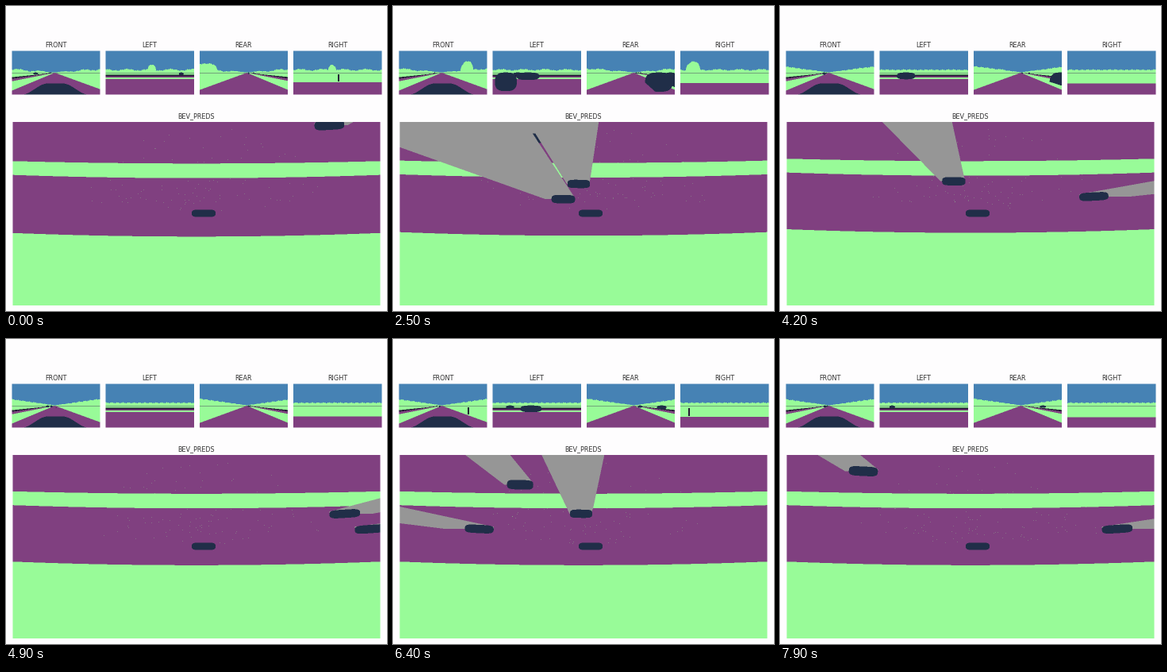
Write a matplotlib script that moves like this. It is 480 by 384 pixels and loops after 8 s.

```python
import numpy as np
import matplotlib.pyplot as plt
from matplotlib.animation import FuncAnimation

W, H, FPS, FRAMES = 480, 384, 10, 80
SS = 2  # supersampling of the label map

PALETTE = np.array([(254, 253, 254), (70, 130, 180), (152, 251, 152),
                    (128, 64, 128), (32, 46, 72), (36, 26, 53),
                    (150, 150, 150), (116, 164, 124)]) / 255
PAGE, SKY, GRASS, ROAD, CAR, RAIL, HIDDEN, LINE = range(len(PALETTE))

lab = np.zeros((H * SS, W * SS), np.uint8)
Y, X = (np.mgrid[0:H * SS, 0:W * SS] + 0.5) / SS

EGO_X, EGO_Y = 249, 261
EYE_X = 242
HORIZON = 84
VANISH = {"FRONT": 61.5, "LEFT": 181, "REAR": 303.5, "RIGHT": 417.5}
FOCAL = {"FRONT": 38, "LEFT": 41, "REAR": 45}

# Oncoming cars: time beside the own car, lane height
ONCOMING = [(-1.04, 166.5), (0.33, 150), (1.08, 167), (1.175, 185),
            (1.28, 151), (2.36, 166.5), (3.34, 166.5), (6.215, 183.5),
            (7.6, 166.5)]
# Cars going the same way: time beside the own car, lane height, speed
PASSING = [(2.55, 225, 300), (2.8, 244.2, 113), (4.3, 225, 300),
           (6.44, 225, 300), (7.05, 244.2, 212)]

# Large trees: time, x, half width, height
TREES = {
    "FRONT": [(1.1, 6, 15, 23), (1.1, 90, 7, 6), (2.5, 93, 8, 11)],
    "LEFT": [(0, 184, 5, 6), (1.1, 195, 9, 10), (3.4, 147, 5, 6)],
    "REAR": [(0, 251, 15, 8), (1.1, 245, 12, 15), (3.4, 252, 6, 7)],
    "RIGHT": [(0, 411, 5, 7), (1.1, 437, 9, 10), (2.5, 378, 9, 10)],
}
TREE_SPEED = {"LEFT": -50, "RIGHT": 70}
TREE_GROWTH = {"FRONT": 0.9, "REAR": -0.9}


def view(x0, y0, x1, y1):
    s = np.s_[round(y0 * SS):round(y1 * SS), round(x0 * SS):round(x1 * SS)]
    return lab[s], X[s], Y[s]


def smooth(v, a, b):
    u = np.clip((v - a) / (b - a), 0, 1)
    return u * u * (3 - 2 * u)


def drift(t):
    """How far the road has shifted sideways, 0 to 1."""
    return smooth(t, 1.5, 5)


def blob(x, y, cx, cy, w, h, tilt=0.0, power=(5, 3)):
    c, s = np.cos(tilt), np.sin(tilt)
    u = ((x - cx) * c + (y - cy) * s) / (w / 2)
    v = ((y - cy) * c - (x - cx) * s) / (h / 2)
    return np.abs(u) ** power[0] + np.abs(v) ** power[1] < 1


def cars_at(t):
    """Cars as (x, y, length, height), farthest first."""
    spots = [(EGO_X - 480 * (t - t0), y, 12) for t0, y in ONCOMING]
    for t0, y, speed in PASSING:
        d = t - t0
        spots.append((EGO_X + speed * d - 6 * d * d, y - 5 * drift(t), 10.5))
    cars = [(x, y, 27.5 + 0.063 * abs(x - EGO_X), h) for x, y, h in spots]
    return sorted(cars, key=lambda c: -np.hypot(c[0] - EGO_X, c[1] - EGO_Y))


def cast_shadow(out, x, y, car):
    cx, cy, length, h = car
    far = y[:, 0] < cy
    out, x, y = out[far], x[far], y[far]
    xs = cx + 0.46 * length * np.array([-1, -1, 1, 1])
    ys = cy + 0.3 * h * np.array([-1, 1, -1, 1])
    edge = (xs - EYE_X) / (EGO_Y - ys)
    ray = (x - EYE_X) / (EGO_Y - y)
    outward = np.sign(cx - EYE_X) * (x - cx) > -length / 2
    shade = (ray > edge.min()) & (ray < edge.max())
    out[shade & (outward | (y < cy - h / 2))] = HIDDEN
    return far, out


def draw_top(t, cars, rng):
    out, x, y = view(8.5, 146, 471.5, 377)
    bend, s = ((x[0] - 240) / 231) ** 2, drift(t)
    out[:] = ROAD
    verge = (y > 198.3 - 3.5 * s - 3 * bend) & (y < 216.7 - 3.5 * s - 4 * bend)
    out[verge | (y > 290.3 - 5.5 * s - 4.5 * bend)] = GRASS

    # Stray labels along the rays leaving the own car
    ang, dist = rng.uniform(0.15, 3.0, 110), rng.uniform(15, 110, 110)
    px = ((EGO_X - 8.5 + 1.4 * dist * np.cos(ang)) * SS).astype(int)
    py = ((EGO_Y - 146 - dist * np.sin(ang)) * SS).astype(int)
    out[py, px] = GRASS

    for car in cars:
        cx, cy, length, h = car
        if not -150 < cx < 630:
            continue
        far, shaded = cast_shadow(out, x, y, car)
        out[far] = shaded
        tilt = -np.radians(0.02 * (cx - EGO_X))
        out[blob(x, y, cx, cy, length, h, tilt)] = CAR
    out[blob(x, y, EGO_X, EGO_Y, 30, 9.4)] = CAR


def skyline(name, x, t):
    speed = TREE_SPEED.get(name, 0)
    growth = TREE_GROWTH.get(name, 0)
    cx, s = VANISH[name], drift(t)
    d = np.abs(x - cx)
    scroll = x - speed * t
    rough = 0.4 * np.sin(0.9 * scroll + 2 * t) + 0.3 * np.sin(2.3 * scroll)
    rough += (1 - s) * np.sin(0.23 * scroll + 1)
    if growth:
        y = HORIZON - 0.5 - (0.07 + 0.07 * s) * d
        rough *= np.clip(d / 30, 0, 1)
    else:
        y = 80.3
    rise = np.zeros_like(x)
    for t0, x0, w, h in TREES[name]:
        dt = t - t0
        g = np.exp(growth * dt)
        xc = cx + (x0 - cx) * g + speed * dt
        dome = np.sqrt(np.clip(1 - ((x - xc) / (w * g)) ** 2, 0, 1))
        fade = 1 - smooth(abs(dt), 0.5, 0.95)
        rise = np.maximum(rise, fade * h * g * dome)
    return y - rise + rough


def draw_lanes(name, out, x, y, t):
    if name == "RIGHT":
        out[y > 96 + 0.3 * t] = ROAD
    elif name == "LEFT":
        out[(y > 86.5) & (y < 88.5)] = RAIL
        out[((y > 88.5) & (y < 90)) | (y > 92)] = ROAD
    else:
        side = -1 if name == "FRONT" else 1
        r = side * (x - VANISH[name]) / np.maximum(y - HORIZON, 0.01)
        ground = y > HORIZON
        out[ground & (r > -2.75) & (r < 2.4)] = ROAD
        out[ground & (r > 5) & (r < 7)] = ROAD
        out[ground & (r > 7) & (r < 9.5)] = RAIL


def draw_camera_car(name, out, x, y, car):
    cx, cy, length, h = car
    xs = cx + 0.45 * length * np.array([-1, -1, 1, 1])
    ys = cy + h / 2 * np.array([-1, 1, -1, 1])
    beside = EGO_Y - ys
    if name == "LEFT":
        depth, lat = beside, xs - 244
        seen = abs(cx - 244) < 2.5 * (EGO_Y - cy)
    else:
        ahead = name == "FRONT"
        depth = xs - 256 if ahead else 240 - xs
        lat = -beside if ahead else beside
        seen = 5 < depth.mean() < 650
    if not seen:
        return
    vx = VANISH[name]
    px = vx + FOCAL[name] * np.arctan2(lat, depth)
    top = HORIZON - 0.3
    bottom = max(HORIZON + 290 / max(depth.min(), 9), top + 2.5)
    body = blob(x, y, (px.min() + px.max()) / 2, (top + bottom) / 2,
                max(np.ptp(px), 2), bottom - top, power=(3, 2.5))
    if name != "LEFT":
        body &= np.abs(x - vx) > 0.09 * beside.min() * (y - HORIZON)
    out[body] = CAR


def draw_pole(out, x, y, px, y0, y1):
    out[(np.abs(x - px) < 0.8) & (y > y0) & (y < y1)] = RAIL


def draw_camera(i, name, t, cars):
    x0 = 7.5 + 118.2 * i
    out, x, y = view(x0, 56.5, x0 + 111.2, 111.5)
    out[:] = np.where(y > skyline(name, x[0], t), GRASS, SKY)
    out[(np.floor(y) == HORIZON) & (out == GRASS)] = LINE
    draw_lanes(name, out, x, y, t)
    if name == "RIGHT":
        draw_pole(out, x, y, 419 + 250 * t, 86, 95)
        draw_pole(out, x, y, 373 + 250 * (t - 6.4), 87, 97)
    else:
        for car in cars:
            draw_camera_car(name, out, x, y, car)
    if name == "FRONT":
        g = np.exp(2 * (t - 6.4))
        draw_pole(out, x, y, VANISH[name] + 33.5 * g, 86, 86 + 9 * g)
        out[y > 97.6 + 14 * smooth(np.abs(x - 62), 10, 42)] = CAR


def render():
    rgb = PALETTE[lab].reshape(H, SS, W, SS, 3)
    return rgb.mean(axis=(1, 3))


def draw(i):
    t = i / FPS
    cars = cars_at(t)
    for k, name in enumerate(VANISH):
        draw_camera(k, name, t, cars)
    draw_top(t, cars, np.random.default_rng(i))
    image.set_data(render())
    return [image]


fig = plt.figure(figsize=(W / 100, H / 100), dpi=100, facecolor=PALETTE[PAGE])
ax = fig.add_axes([0, 0, 1, 1])
ax.axis("off")
image = ax.imshow(render(), interpolation="nearest", aspect="auto")


def title(text, x, y):
    fig.text(x / W, 1 - y / H, text, ha="center", va="baseline",
             family="DejaVu Sans", size=5.85, color="#303030")


for k, name in enumerate(VANISH):
    title(name, 63 + 118.2 * k, 52.3)
title("BEV_PREDS", 240, 141.3)

anim = FuncAnimation(fig, draw, frames=FRAMES, interval=1000 / FPS,
                     repeat=True, repeat_delay=0)
plt.show()
```
